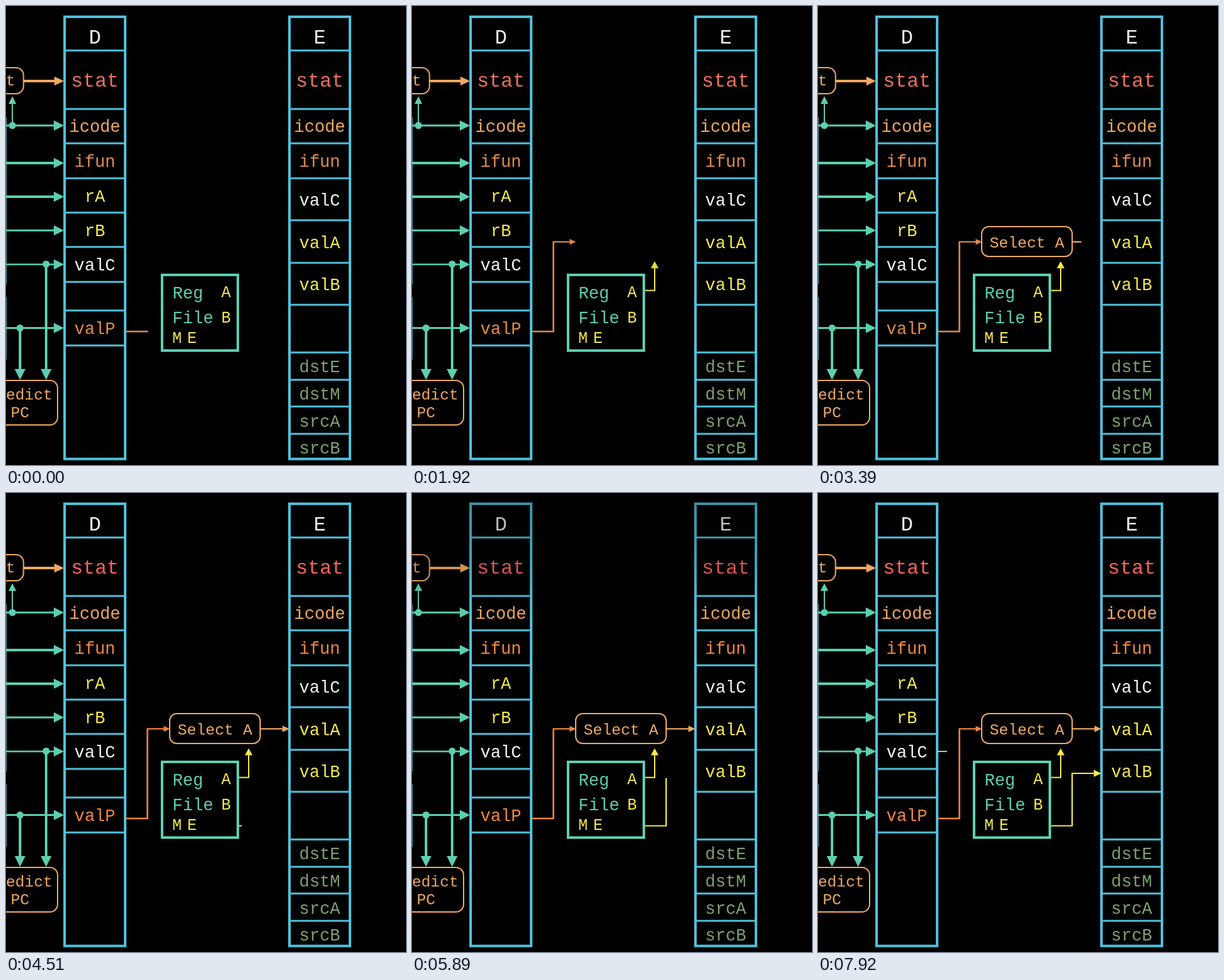
Animation, 628 px wide and 722 px high, one loop 7990 ms. Source, as an HTML page:

```html
<!DOCTYPE html>
<html lang="en">
<head>
<meta charset="utf-8">
<title>Pipeline registers</title>
<style>
html, body { margin: 0; width: 100%; height: 100%; overflow: hidden; background: #000; }
svg { display: block; width: 628px; height: 722px; }
text { font-family: "Liberation Mono", "DejaVu Sans Mono", monospace; text-anchor: middle; }
</style>
</head>
<body>
<svg id="stage" viewBox="0 0 628 722">
  <defs>
    <linearGradient id="shade" x1="0" y1="0" x2="0" y2="1">
      <stop offset="0" stop-opacity=".27"/>
      <stop offset=".5" stop-opacity=".17"/>
      <stop offset="1" stop-opacity="0"/>
    </linearGradient>
  </defs>
</svg>
<script>
const LOOP = 7990;
const BLUE = '#50c0da', TEAL = '#5ccfb1', GOLD = '#f0a960', YELLOW = '#f5e94a',
      WHITE = '#f4f6f2', GREEN = '#7fa071';
const RED = 'var(--red)', ORANGE = 'var(--orange)';
const stage = document.getElementById('stage');

function add(tag, attrs, parent = stage) {
  const el = document.createElementNS('http://www.w3.org/2000/svg', tag);
  for (const key in attrs) el.setAttribute(key, attrs[key]);
  return parent.appendChild(el);
}
function label(str, x, y, fill, size = 26.8, parent = stage) {
  const el = add('text', { x, y, 'font-size': size, style: `fill:${fill}` }, parent);
  el.textContent = str;
  return el;
}
function path(d, color, width = 2, parent = stage) {
  return add('path', { d, fill: 'none', 'stroke-width': width, style: `stroke:${color}` }, parent);
}
function box(x, y, w, h, color, width, r = 0, parent = stage) {
  return add('rect', { x, y, width: w, height: h, rx: r, fill: 'none', stroke: color, 'stroke-width': width }, parent);
}
// Arrow head with its tip at (x, y), pointing along angle (degrees).
function head(x, y, angle, color, len = 16, half = 8) {
  return add('path', {
    d: `M0 0L${-len} ${-half}V${half}Z`,
    transform: `translate(${x} ${y}) rotate(${angle})`, style: `fill:${color}`
  });
}
const dot = (cx, cy) => add('circle', { cx, cy, r: 5.5, fill: TEAL });

// Each row: bottom edge, text, baseline, colour, size.
function register(x, rows) {
  for (const [bottom, str, base, color, size] of rows) {
    if (bottom < 713) path(`M${x} ${bottom}h95`, BLUE, 3.2);
    if (str) label(str, x + 47.5, base, color, size);
  }
  box(x, 17, 95, 695.5, BLUE, 4);
}

// Fetch side, cut off by the left edge
path('M0 175V438M0 458V556', '#4a9cb4', 2);
box(-60, 97, 87.5, 41, GOLD, 2, 12);
label('t', 7, 125, GOLD, 24.3);
path('M28 118H78', GOLD, 4);
head(91, 118, 0, GOLD, 15, 7);

for (const [y, width] of [[188, 3], [247, 4], [300, 4], [353, 3], [406.5, 2.4], [506.5, 3]]) {
  path(`M0 ${y}H77`, TEAL, width);
  head(91, y, 0, TEAL);
}
path('M10 188V150', TEAL, 2);
head(10, 142, -90, TEAL, 12, 6);
dot(10, 188);
for (const [x, y] of [[63, 406], [22, 506.5]]) {
  path(`M${x} ${y}V574`, TEAL, 4);
  head(x, 588, 90, TEAL, 17, 8.5);
  dot(x, y);
}
box(-60, 589, 141, 70, GOLD, 2, 12);
label('Predict', 21.8, 619, GOLD, 24.3);
label('PC', 22, 647, GOLD, 24.3);

register(92, [
  [70, 'D', 59, WHITE, 32], [162, 'stat', 127, RED, 31.3], [216, 'icode', 198, GOLD],
  [271, 'ifun', 253, ORANGE], [325, 'rA', 308, YELLOW], [379, 'rB', 362, YELLOW],
  [434, 'valC', 416, WHITE], [479], [534, 'valP', 516, ORANGE]
]);
register(445, [
  [70, 'E', 59, WHITE, 32], [162, 'stat', 127, RED, 31.3], [216, 'icode', 198, GOLD],
  [271, 'ifun', 253, ORANGE], [337, 'valC', 314, WHITE], [404, 'valA', 381, YELLOW],
  [470, 'valB', 447, YELLOW], [545], [588, 'dstE', 576, GREEN], [630, 'dstM', 619, GREEN],
  [673, 'srcA', 662, GREEN], [713, 'srcB', 704, GREEN]
]);

box(245, 423, 119, 119, TEAL, 4);
label('Reg', 285.5, 460, TEAL);
label('File', 293.5, 498.5, TEAL);
label('A', 345.5, 458, YELLOW, 25);
label('B', 345.5, 498, YELLOW, 25);
label('M', 268.5, 530, YELLOW, 25);
label('E', 292, 530, YELLOW, 25);

const select = add('g', {});
box(257, 347, 142, 47, GOLD, 2, 11, select);
label('Select A', 328, 379.5, GOLD, 24.4, select);

// Wires: path, colour, start, end, width, optional head
path('M188 512H223', ORANGE, 2.4);
const wires = [
  ['M222 513V371', ORANGE, 0, 1050, 2.6],
  ['M366 447.5H382', YELLOW, 0, 1050, 2],
  ['M221 371H250', ORANGE, 1050, 2050, 2, [257.5, 371, 0, 10, 4.5]],
  ['M381 448V411', YELLOW, 1050, 2050, 2, [381, 401.5, -90, 11, 6]],
  ['M400 371H438', GOLD, 2950, 3950, 2.2, [445, 371, 0, 11, 5]],
  ['M366 523.5H400', YELLOW, 4200, 5200, 2],
  ['M399 524V441', YELLOW, 5200, 6150, 2.2],
  ['M398 441H437', YELLOW, 6150, 7150, 2, [445, 441, 0, 12, 5.5]],
  ['M188 406.5H222', WHITE, 7450, 8450, 1.6]
].map(([d, color, start, end, width, tip]) => {
  const line = path(d, color, width);
  const length = line.getTotalLength();
  line.setAttribute('stroke-dasharray', `${length} ${length + 5}`);
  const arrow = tip && head(tip[0], tip[1], tip[2], color, tip[3], tip[4]);
  return { line, length, arrow, start, end };
});

const shade = add('rect', { width: 628, height: 200, fill: 'url(#shade)' });

const clamp = v => Math.min(1, Math.max(0, v));
const sigmoid = v => 1 / (1 + Math.exp(-v));
function smooth(t, start, end) {
  const low = sigmoid(-5);
  return clamp((sigmoid(10 * (clamp((t - start) / (end - start)) - 0.5)) - low) / (1 - 2 * low));
}

function draw(t) {
  const vivid = t >= 4230;
  stage.style.setProperty('--red', vivid ? '#f4625a' : '#ea7058');
  stage.style.setProperty('--orange', vivid ? '#f5863c' : '#e38a48');
  for (const { line, length, arrow, start, end } of wires) {
    const p = smooth(t, start, end);
    line.setAttribute('stroke-dashoffset', length * (1 - p));
    line.setAttribute('visibility', p > 0.005 ? 'visible' : 'hidden');
    if (arrow) arrow.setAttribute('opacity', clamp((p - 0.7) / 0.3));
  }
  select.setAttribute('opacity', smooth(t, 2100, 3100));
  shade.setAttribute('opacity', clamp((t - 4600) / 300) * clamp((6250 - t) / 300));
}

const origin = performance.now();
function tick() {
  draw((performance.now() - origin) % LOOP);
  requestAnimationFrame(tick);
}
tick();
</script>
</body>
</html>
```
